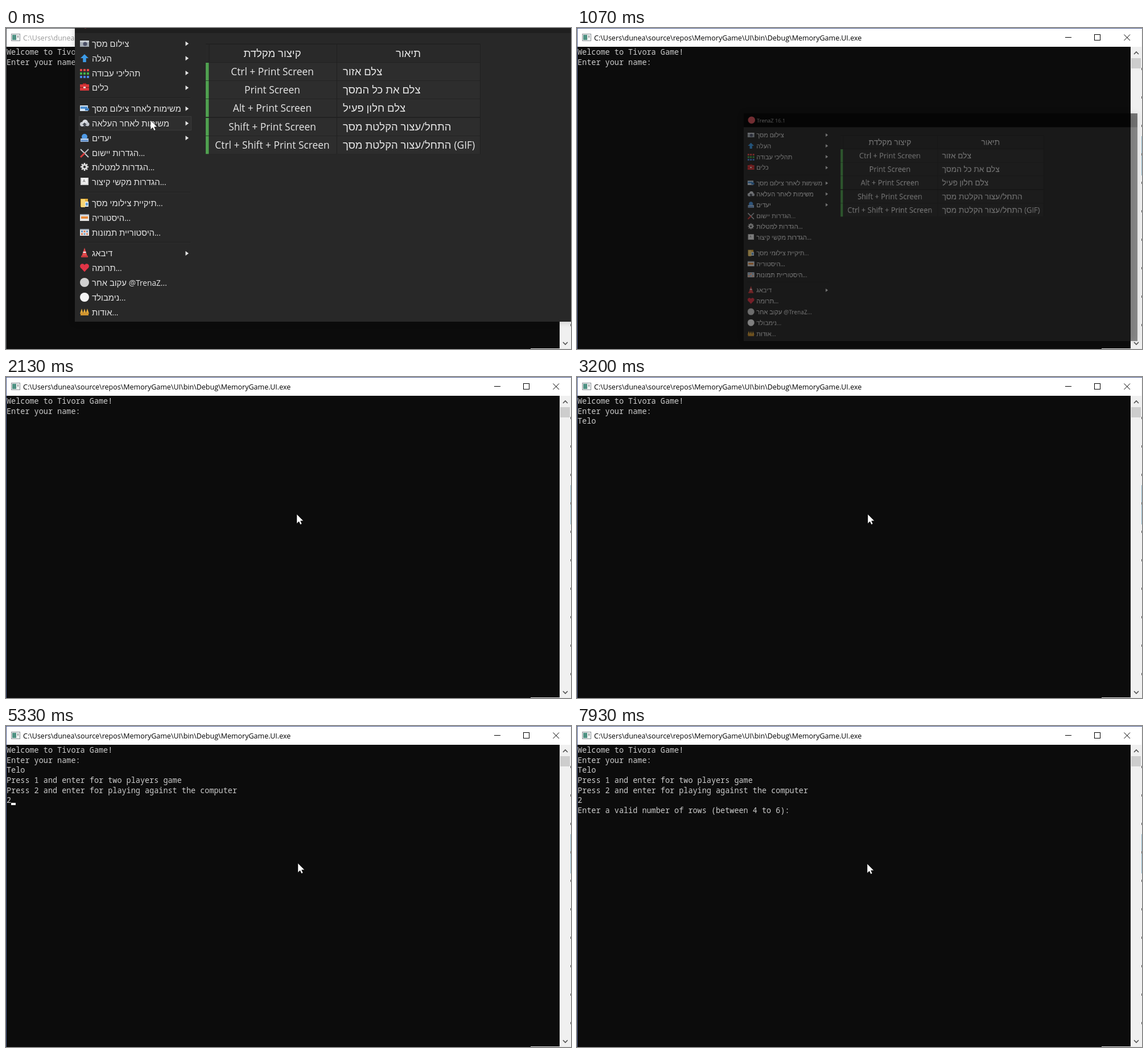
An HTML page with a canvas for the animation above (8 s loop, 993 by 564 pixels).

```html
<!DOCTYPE html>
<html lang="en">
<head>
<meta charset="utf-8">
<title>Console session</title>
<style>
html, body { margin: 0; width: 100%; height: 100%; overflow: hidden; background: #0c0c0c; }
canvas { display: block; width: 993px; height: 564px; }
</style>
</head>
<body>
<canvas id="stage" width="993" height="564"></canvas>
<script>
const LOOP = 8000;
const TICK = 200 / 3; // screen updates 15 times a second
const stage = document.getElementById('stage').getContext('2d');
const SANS = '"Open Sans", "Liberation Sans", sans-serif';
const MONO = '"Noto Sans Mono", "DejaVu Sans Mono", monospace';

// The menu window is drawn on its own layer so that it can shrink and fade as one.
const PANEL = { x: 121, y: -24, w: 935, h: 540 };
const layer = document.createElement('canvas');
layer.width = PANEL.w;
layer.height = PANEL.h;
const panel = layer.getContext('2d');

function rect(c, x, y, w, h, color) {
  c.fillStyle = color;
  c.fillRect(x, y, w, h);
}
function disc(c, x, y, r, color) {
  c.fillStyle = color;
  c.beginPath();
  c.arc(x, y, r, 0, Math.PI * 2);
  c.fill();
}
function trace(c, points) {
  c.beginPath();
  points.forEach(([x, y]) => c.lineTo(x, y));
}
function poly(c, points, color) {
  trace(c, points);
  c.closePath();
  c.fillStyle = color;
  c.fill();
}
function line(c, points, color, width = 1) {
  trace(c, points);
  c.strokeStyle = color;
  c.lineWidth = width;
  c.stroke();
}
function triangle(c, x, y, halfWidth, height, color) {
  poly(c, [[x, y], [x + halfWidth, y + height], [x - halfWidth, y + height]], color);
}
function upArrow(c, x, y, size, color) {
  triangle(c, x, y, size / 2, size / 2, color);
  rect(c, x - size / 5, y + size / 2, size / 2.5, size / 2, color);
}
function chevron(c, x, y, rise) {
  line(c, [[x - 4, y + rise], [x, y], [x + 4, y + rise]], '#505050', 1.6);
}

// Mixed Hebrew and Latin runs, laid out from left to right.
function label(c, text, x, y, size, color, centered) {
  const runs = text.match(/[\u0590-\u05ff][\u0590-\u05ff \/]*|[^\u0590-\u05ff]+/g).map(run => {
    const hebrew = /[\u0590-\u05ff]/.test(run);
    const font = `${hebrew ? size + 1.15 : size}px ${SANS}`;
    c.font = font;
    return { run, font, width: c.measureText(run).width };
  });
  if (centered) x -= runs.reduce((sum, r) => sum + r.width, 0) / 2;
  c.fillStyle = color;
  c.direction = 'ltr';
  for (const { run, font, width } of runs) {
    c.font = font;
    c.fillText(run, x, y);
    x += width;
  }
}

function windowIcon(c) {
  rect(c, 0, 1, 16, 12, '#e6e6e6');
  rect(c, 0, 1, 16, 2, '#9ba6b2');
}

// Each icon fills a 16 px box.
const icons = {
  camera(c) {
    rect(c, 0, 2, 16, 11, '#a3abb3');
    rect(c, 0, 2, 16, 3, '#c9ced3');
    disc(c, 9, 8, 3.5, '#4a4f66');
  },
  up(c) { upArrow(c, 8, 0, 14, '#3c9be8'); },
  grid(c) {
    ['#e04848', '#46b04a', '#4a83e0'].forEach((color, row) => {
      for (let col = 0; col < 3; col++) rect(c, col * 6, row * 6, 4, 4, color);
    });
  },
  toolbox(c) {
    rect(c, 5, 0, 6, 3, '#a02020');
    rect(c, 0, 2, 16, 11, '#d8363a');
    rect(c, 0, 7, 16, 1, '#7d1818');
    rect(c, 6, 6, 4, 3, '#e8e0d8');
  },
  picture(c) {
    rect(c, 0, 2, 14, 10, '#d5e4f2');
    rect(c, 1, 4, 12, 4, '#4d8fd0');
    rect(c, 9, 7, 7, 4, '#3779bd');
  },
  cloud(c) {
    disc(c, 4, 9, 4, '#c9cdd4');
    disc(c, 9, 6, 5, '#d9dce2');
    disc(c, 13, 9, 3.5, '#c2c6cf');
    upArrow(c, 8, 6, 8, '#41454d');
  },
  drive(c) {
    disc(c, 8, 5, 5, '#4f9ae6');
    rect(c, 1, 8, 14, 6, '#a9c4e6');
    rect(c, 2, 11, 12, 2, '#5787c4');
  },
  tools(c) {
    line(c, [[1, 1], [15, 15]], '#c8ccd0', 2);
    line(c, [[15, 1], [7, 9]], '#b9bec4', 2);
    line(c, [[8, 8], [1, 15]], '#d43b3b', 3);
  },
  gear(c) {
    for (let angle = 0; angle < Math.PI; angle += Math.PI / 4) {
      const dx = 7 * Math.cos(angle), dy = 7 * Math.sin(angle);
      line(c, [[8 - dx, 7 - dy], [8 + dx, 7 + dy]], '#dcdcdc', 2.5);
    }
    disc(c, 8, 7, 5, '#dcdcdc');
    disc(c, 8, 7, 2.2, '#333');
  },
  key(c) {
    rect(c, 1, 0, 14, 13, '#d4d4d4');
    rect(c, 3, 1, 10, 10, '#f2f2f2');
    label(c, 'A', 5, 8, 7, '#555');
  },
  folder(c) {
    rect(c, 1, 0, 13, 14, '#e4ad38');
    rect(c, 2, 1, 7, 14, '#f6d67a');
    rect(c, 9, 5, 6, 9, '#e8edf2');
    rect(c, 10, 7, 4, 5, '#5d9bd6');
  },
  history(c) {
    windowIcon(c);
    rect(c, 2, 5, 12, 4, '#e5893a');
  },
  gallery(c) {
    windowIcon(c);
    for (let i = 0; i < 6; i++) {
      rect(c, 2 + i % 3 * 4.5, i < 3 ? 4 : 8.5, 3, 3, i % 2 ? '#d97852' : '#6797c4');
    }
  },
  cone(c) {
    triangle(c, 8, -2, 5, 15, '#e2484b');
    rect(c, 5.5, 5, 5, 2, '#eee');
    rect(c, 2, 12, 12, 3, '#c2383b');
  },
  heart(c) {
    disc(c, 4.3, 4.5, 4.2, '#e23446');
    disc(c, 11.7, 4.5, 4.2, '#e23446');
    triangle(c, 8, 14.5, 7.3, -8, '#e23446');
  },
  grayDisc(c) { disc(c, 8, 7, 8, '#d0d0d0'); },
  whiteDisc(c) { disc(c, 8, 7, 8, '#f4f4f4'); },
  crown(c) {
    for (let x = 3; x < 16; x += 5) triangle(c, x, 1, 3, 9, '#e6ac3c');
    rect(c, 1, 8, 14, 5, '#d1952f');
  }
};

// Menu groups; a trailing > opens a submenu.
const menu = [
  [
    ['camera', 'צילום מסך', '>'],
    ['up', 'העלה', '>'],
    ['grid', 'תהליכי עבודה', '>'],
    ['toolbox', 'כלים', '>']
  ], [
    ['picture', 'משימות לאחר צילום מסך', '>'],
    ['cloud', 'משימות לאחר העלאה', '>'],
    ['drive', 'יעדים', '>'],
    ['tools', 'הגדרות יישום...'],
    ['gear', 'הגדרות למטלות...'],
    ['key', 'הגדרות מקשי קיצור...']
  ], [
    ['folder', 'תיקיית צילומי מסך...'],
    ['history', 'היסטוריה...'],
    ['gallery', 'היסטוריית תמונות...']
  ], [
    ['cone', 'דיבאג', '>'],
    ['heart', 'תרומה...'],
    ['grayDisc', 'עקוב אחר @TrenaZ...'],
    ['whiteDisc', 'נימבולד...'],
    ['crown', 'אודות...']
  ]
];

const shortcuts = [
  ['קיצור מקלדת', 'תיאור'],
  ['Ctrl + Print Screen', 'צלם אזור'],
  ['Print Screen', 'צלם את כל המסך'],
  ['Alt + Print Screen', 'צלם חלון פעיל'],
  ['Shift + Print Screen', 'התחל/עצור הקלטת מסך'],
  ['Ctrl + Shift + Print Screen', 'התחל/עצור הקלטת מסך (GIF)']
];

function drawMenu(c, t) {
  const pitch = 25.8, gap = 11;
  let y = 28;
  menu.forEach((group, index) => {
    if (index) {
      y += gap;
      rect(c, 128, Math.round(y - 20), 196, 1, '#1f1f1f');
      rect(c, 128, Math.round(y - 19), 196, 1, '#2e2e2e');
    }
    for (const [icon, text, submenu] of group) {
      if (icon === 'cloud' && t < TICK) {
        rect(c, 128, 155, 198, 25, '#3a3a3a');
        rect(c, 129, 156, 196, 23, '#2e2e2e');
      }
      c.save();
      c.translate(130, Math.round(y - 8));
      icons[icon](c);
      c.restore();
      label(c, text, 151, Math.round(y + 5), 13.7, '#e4e4e4');
      if (submenu) poly(c, [[315.5, y - 4.5], [321, y - .5], [315.5, y + 3.5]], '#e4e4e4');
      y += pitch;
    }
  });
}

function drawTable(c) {
  const top = 27.5, pitch = 32.3;
  rect(c, 351, top, 483, pitch * 6, '#202020');
  shortcuts.forEach(([keys, action], row) => {
    const y = Math.round(top + row * pitch), baseline = y + 23;
    const fill = row ? '#2d2d2d' : '#292929';
    rect(c, 351, y + 1, 5.5, pitch - 1, row ? '#50a050' : fill);
    rect(c, 357.5, y + 1, 223.5, pitch - 1, fill);
    rect(c, 582, y + 1, 251, pitch - 1, fill);
    label(c, keys, 468, baseline, 17.4, '#e8e8e8', true);
    label(c, action, row ? 592 : 707, baseline, 17.4, '#e8e8e8', !row);
  });
}

function drawPanel(c, t) {
  c.save();
  c.translate(-PANEL.x, -PANEL.y);
  rect(c, PANEL.x, PANEL.y, PANEL.w, PANEL.h, '#282828');
  rect(c, PANEL.x, PANEL.y, PANEL.w, 33, t < 930 ? '#1f1f1f' : '#000');
  // The pointer passes over the maximize button, then the minimize button.
  if (t >= 530 && t < 1060) rect(c, t < 730 ? 952 : 900, PANEL.y, 51, 32, '#363636');
  disc(c, 139.5, -8, 8.5, '#d8505a');
  label(c, 'TrenaZ 16.1', 152, -2, 12.5, '#aaa');
  drawMenu(c, t);
  drawTable(c);
  c.restore();
}

// Minimizes toward a point on the taskbar.
function showPanel(c, t) {
  const shrink = Math.max(0, (t - 1000) / TICK);
  if (shrink >= 2) return;
  drawPanel(panel, t);
  const scale = 1 - .26 * shrink;
  c.save();
  c.globalAlpha = 1 - shrink / 2;
  c.shadowColor = 'rgba(0,0,0,.2)';
  c.shadowBlur = 12;
  c.translate(783, 645);
  c.scale(scale, scale);
  c.translate(-783, -645);
  c.imageSmoothingQuality = 'high';
  c.drawImage(layer, PANEL.x, PANEL.y);
  c.restore();
}

const ROW = 17.6, COL = 8.1, TOP = 33.3;
const FOCUS = 1600, ANSWER = 5330, BLINK = 520, KEY_DELAY = 90;
const session = [
  { at: 0, text: 'Welcome to Tivora Game!' },
  { at: 0, text: 'Enter your name:' },
  { at: 2600, text: 'Telo', typed: true },
  { at: 3470, text: 'Press 1 and enter for two players game' },
  { at: 3470, text: 'Press 2 and enter for playing against the computer' },
  { at: ANSWER, text: '2', typed: true },
  { at: 6130, text: 'Enter a valid number of rows (between 4 to 6):' }
];

function drawSession(c, t) {
  const lines = session.filter(entry => t >= entry.at);
  const last = lines[lines.length - 1];
  const typedCount = Math.floor((t - last.at) / KEY_DELAY) + 1;
  c.font = `13.5px ${MONO}`;
  c.fillStyle = '#ccc';
  lines.forEach((entry, row) => {
    const text = entry === last && entry.typed ? entry.text.slice(0, typedCount) : entry.text;
    c.fillText(text, 1, Math.round(TOP + row * ROW + 13.8));
  });

  // The caret blinks, and shows at once after new output.
  const blinkStart = t < ANSWER ? FOCUS : ANSWER;
  const lit = Math.floor((t - blinkStart) / BLINK) % 2 === 0 || t - last.at < BLINK / 2;
  if (t < FOCUS || !lit) return;
  const row = last.typed ? lines.length : lines.length + 1;
  const col = last.typed ? Math.min(typedCount, last.text.length) : 0;
  rect(c, Math.round(1 + col * COL), Math.round(TOP + row * ROW - 4), 8, 4, '#f2f2f2');
}

function drawConsole(c, t) {
  const active = t >= 1060;
  const ink = active ? '#000' : '#999';
  rect(c, 0, 0, 993, 564, active ? '#4a5a8c' : '#4c4f55');
  rect(c, 1, 1, 991, 32, '#fff');
  rect(c, 1, 33, 972, 531, '#0c0c0c');

  rect(c, 9, 10, 16, 13, '#8d9499');
  rect(c, 10, 11, 14, 11, '#eef0f0');
  rect(c, 11, 12, 7, 9, '#4f9283');
  rect(c, 20.5, 13, 1, 4, '#555');
  label(c, 'C:\\Users\\dunea\\source\\repos\\MemoryGame\\UI\\bin\\Debug\\MemoryGame.UI.exe',
    30, 22, 12.5, ink);
  line(c, [[858, 16.5], [869, 16.5]], ink);
  c.strokeRect(909.5, 11.5, 10, 10);
  line(c, [[961.5, 11.5], [972, 22]], ink);
  line(c, [[972, 11.5], [961.5, 22]], ink);

  rect(c, 973, 33, 19, 531, '#f0f0f0');
  rect(c, 974, 53, 17, 18, '#cdcdcd');
  chevron(c, 983, 42, 4);
  chevron(c, 983, 556, -4);
  rect(c, 922, 563, 71, 1, '#e8e8e8');

  // Sliver of the window behind
  rect(c, 992, 1, 1, 563, '#f2f2f2');
  rect(c, 992, 190, 1, 69, '#8cb8cc');
  for (let y = 70; y < 564; y += 50) rect(c, 992, y, 1, 4, '#555');

  drawSession(c, t);
}

const moves = [
  { start: 0, end: 200, from: [254, 162], to: [920, 27] },
  { start: 1200, end: 1670, from: [880, 12], to: [511, 241] },
  { start: 4800, end: 5000, from: [511, 241], to: [513, 241] },
  { start: 6530, end: 6730, from: [513, 241], to: [510, 242] }
];

function drawPointer(c, t) {
  if (t > 210 && t < 1190) return; // above the top edge
  const move = moves.filter(m => t >= m.start - 5).pop();
  const p = Math.min(1, Math.max(0, (t - move.start) / (move.end - move.start)));
  const eased = p * (2 - p);
  const [x, y] = move.from.map((from, i) => Math.round(from + (move.to[i] - from) * eased));
  c.save();
  c.translate(x, y);
  poly(c, [[0, 0], [0, 16.5], [3.8, 13], [6.3, 18.3], [9, 17.1], [6.6, 11.9], [11.7, 11.7]], '#fff');
  c.strokeStyle = 'rgba(0,0,0,.75)';
  c.lineWidth = .7;
  c.stroke();
  c.restore();
}

function frame(now) {
  const t = now % LOOP;
  const tick = Math.floor((t + 4) / TICK) * TICK;
  drawConsole(stage, t);
  showPanel(stage, t < 1000 ? t : tick);
  drawPointer(stage, tick);
  requestAnimationFrame(frame);
}
frame(0);
</script>
</body>
</html>
```
